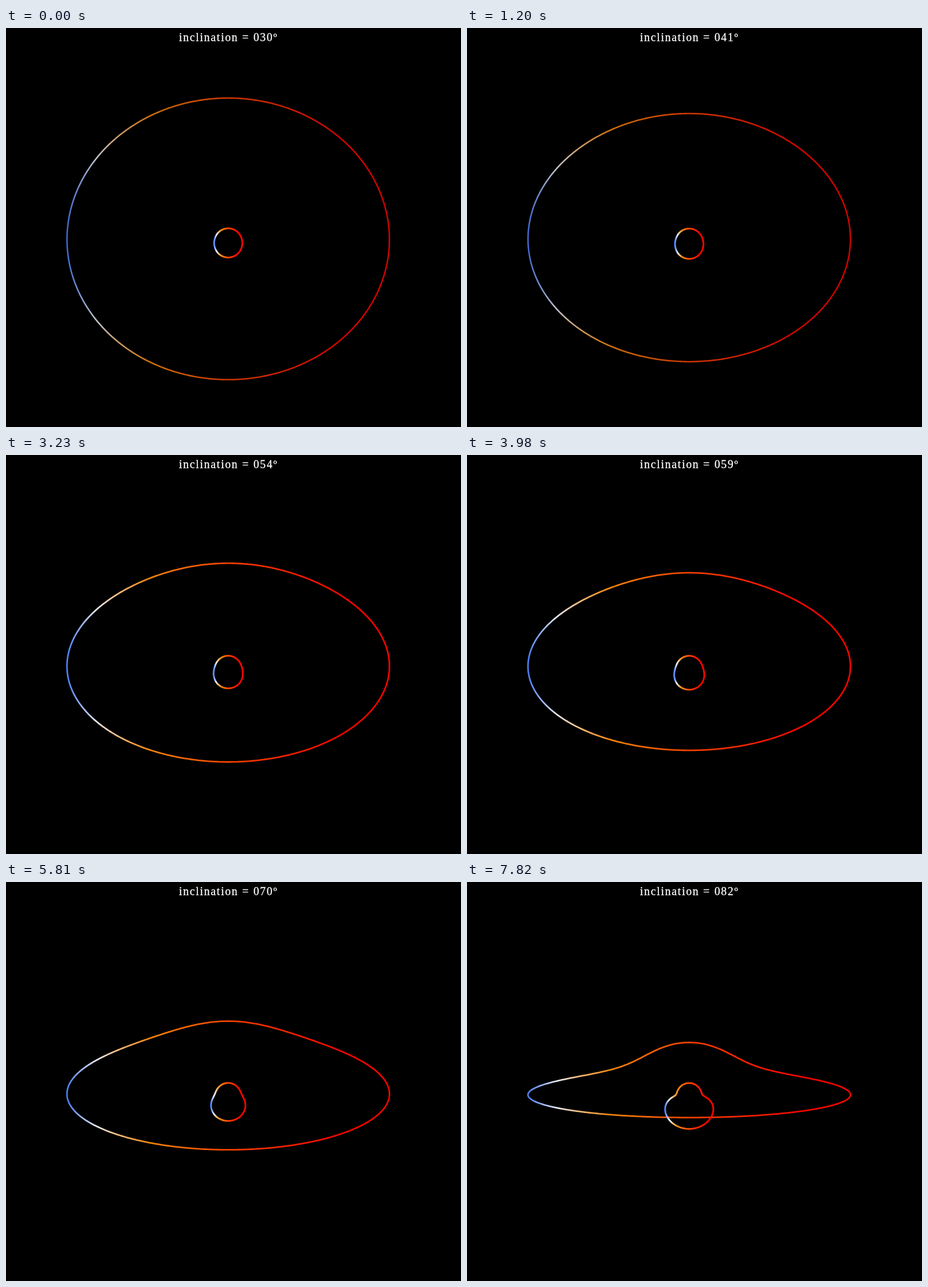
An HTML page with a canvas for the animation above (8 s loop, 799x701 px).

```html
<!DOCTYPE html>
<html lang="en">
<head>
<meta charset="utf-8">
<title>Lensed ring</title>
<style>
html, body { margin: 0; height: 100%; overflow: hidden; background: #000; }
canvas { display: block; }
</style>
</head>
<body>
<canvas id="stage" width="799" height="701"></canvas>
<script>
const ctx = document.getElementById('stage').getContext('2d');
const LOOP = 8000, CX = 390.2, CY = 375;
const HORIZON = 8.12, RADIUS = 279; // pixels

// Doppler tint from the approaching (left) to the receding (right) edge of a ring.
const tint = { 0: '#5082ff', 0.09: '#f2f5ff', 0.16: '#ffc382', 0.26: '#ff8a0a', 0.5: '#ff4400', 0.85: '#ff0500' };

// Follows a light ray around the hole; true if it is inside the ring's radius at angle psi.
function passesInside(impact, psi) {
  const steps = Math.ceil(psi / 0.02), h = psi / steps;
  const bend = w => w * (1.5 * HORIZON * w - 1);
  let w = 0, v = 1 / impact;
  for (let k = 0; k < steps; k++) {
    v += h / 2 * bend(w);
    w += h * v;
    v += h / 2 * bend(w);
    if (w < 0) return false;
    if (w > 1 / HORIZON) return true;
  }
  return w > 1 / RADIUS;
}

// Impact parameter for each whole degree of travel around the hole.
const impacts = Array.from({ length: 361 }, (_, degree) => {
  let low = 0, high = 400;
  for (let k = 0; k < 24 && degree; k++) {
    const mid = (low + high) / 2;
    if (passesInside(mid, degree * Math.PI / 180)) low = mid; else high = mid;
  }
  return low;
});

function impactAt(psi) {
  const degree = psi * 180 / Math.PI, k = Math.min(359, Math.floor(degree));
  return impacts[k] + (impacts[k + 1] - impacts[k]) * (degree - k);
}

// The secondary image is made by light that goes the long way round the hole.
function ringPoints(tilt, secondary) {
  const points = [];
  for (let k = 0; k < 480; k++) {
    const phi = k * Math.PI / 240;
    const psi = Math.acos(Math.sin(phi) * Math.sin(tilt));
    const b = secondary ? -impactAt(2 * Math.PI - psi) : impactAt(psi);
    const scale = b / Math.sin(psi);
    points.push([CX + scale * Math.cos(phi), CY + scale * Math.sin(phi) * Math.cos(tilt)]);
  }
  return points;
}

function drawRing(points, width, brightness) {
  const reach = Math.max(...points.map(p => p[0])) - CX;
  const gradient = ctx.createLinearGradient(CX - reach, 0, CX + reach, 0);
  for (const stop in tint) gradient.addColorStop(stop, tint[stop]);
  ctx.beginPath();
  points.forEach(p => ctx.lineTo(...p));
  ctx.closePath();
  ctx.globalAlpha = brightness;
  ctx.strokeStyle = gradient;
  ctx.lineWidth = width;
  ctx.stroke();
  ctx.globalAlpha = 1;
}

// A quick start, then one degree every 167 ms.
function inclinationAt(time) {
  return Math.floor(Math.min(30 + time / 108, 46 + (time - 1800) / 167));
}

function draw() {
  const degrees = inclinationAt(performance.now() % LOOP), tilt = degrees * Math.PI / 180;
  const sparse = degrees < 45;

  ctx.fillStyle = '#000';
  ctx.fillRect(0, 0, 799, 701);
  drawRing(ringPoints(tilt, false), sparse ? 2.6 : 2.8, sparse ? 0.8 : 0.95);
  drawRing(ringPoints(tilt, true), 3, 1);

  const label = `inclination = ${String(degrees).padStart(3, '0')}º`;
  ctx.font = '20px "Liberation Serif", "Times New Roman", serif';
  ctx.letterSpacing = '1.7px';
  ctx.fillStyle = ctx.strokeStyle = '#fff';
  ctx.lineWidth = 0.3;
  ctx.fillText(label, 303.8, 23);
  ctx.strokeText(label, 303.8, 23);
  requestAnimationFrame(draw);
}
draw();
</script>
</body>
</html>
```
